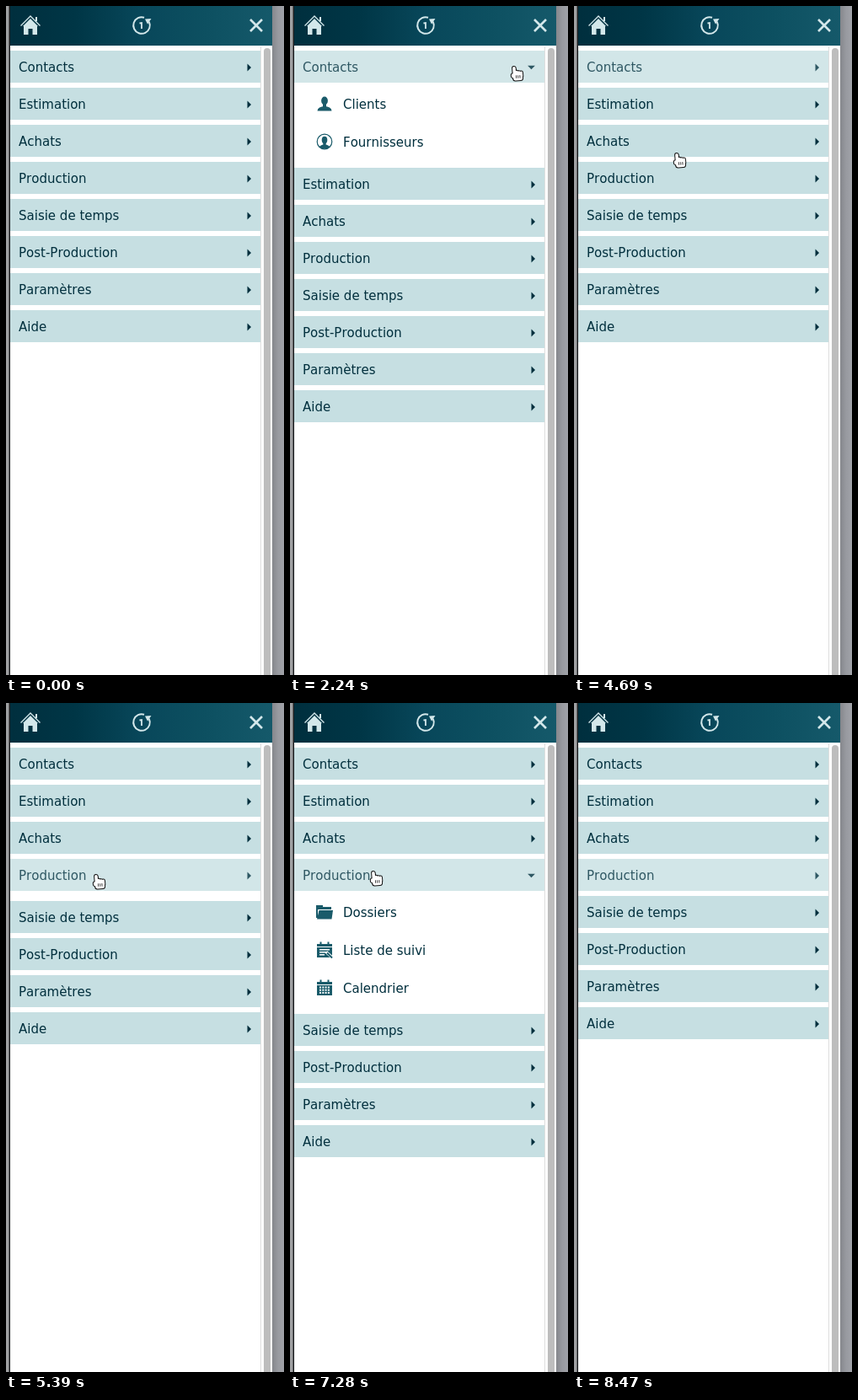
An HTML page with a canvas that plays this animation: 330x794 px, repeating every 8890 ms.

```html
<!DOCTYPE html>
<html lang="fr">
<head>
<meta charset="utf-8">
<title>Menu</title>
<style>
  html, body { margin: 0; width: 100%; height: 100%; overflow: hidden; background: #fff; }
  canvas { display: block; }
</style>
</head>
<body>
<canvas id="stage" width="330" height="794"></canvas>
<script>
const W = 330, H = 794, LOOP = 8890, STEP = 70;
const ctx = document.getElementById('stage').getContext('2d');
const DARK = '#002f3d', TEAL = '#1a5b6a', ROW = '#c6dfe2', LIGHT = '#d3e7ea';
const TOP = 53, ROW_H = 38, PITCH = 44, ITEM_H = 45;

const menu = ['Contacts', 'Estimation', 'Achats', 'Production', 'Saisie de temps',
  'Post-Production', 'Paramètres', 'Aide'].map(label => ({ label }));
Object.assign(menu[0], { open: 1960, close: 4410,
  items: [['Clients', bust], ['Fournisseurs', supplier]] });
Object.assign(menu[3], { open: 5390, close: 7630,
  items: [['Dossiers', folder], ['Liste de suivi', list], ['Calendrier', calendar]] });

// Pointer: where it enters, then each move to a new place
const entry = { x: 195, y: 702 };
const moves = [
  { from: 210, to: 1050, x: 266, y: 72 },
  { from: 2870, to: 3430, x: 43, y: 124 },
  { from: 3780, to: 4200, x: 178, y: 67 },
  { from: 4320, to: 4690, x: 122, y: 175 },
  { from: 4830, to: 5180, x: 107, y: 204 },
  { from: 6090, to: 6370, x: 141, y: 265 },
  { from: 6370, to: 6790, x: 35, y: 341 },
  { from: 7000, to: 7280, x: 99, y: 200 },
  { from: 7560, to: 8400, x: 160, y: 780 }
];

const mix = (a, b, k) => a + (b - a) * k;

// Smooth progress of t from start to end
function ease(t, start, end) {
  const v = Math.max(0, Math.min(1, (t - start) / (end - start)));
  return v * v * (3 - 2 * v);
}

function rect(x, y, w, h, color) {
  ctx.fillStyle = color;
  ctx.fillRect(x, y, w, h);
}

function trace(points) {
  ctx.beginPath();
  points.forEach(p => ctx.lineTo(...p));
}

function poly(points, color) {
  trace(points);
  ctx.fillStyle = color;
  ctx.fill();
}

function line(points, color, width) {
  trace(points);
  stroke(color, width);
}

function stroke(color, width) {
  ctx.strokeStyle = color;
  ctx.lineWidth = width;
  ctx.stroke();
}

function at(x, y, draw, turn = 0, scale = 1) {
  ctx.save();
  ctx.translate(x, y);
  ctx.rotate(turn);
  ctx.scale(scale, scale);
  draw();
  ctx.restore();
}

function text(label, x, y) {
  ctx.fillStyle = DARK;
  ctx.font = '15px "DejaVu Sans", Verdana, sans-serif';
  ctx.fontKerning = 'none';
  ctx.fillText(label, x, y);
}

// Submenu icons, centred on the current origin
function bust() {
  ctx.fillStyle = TEAL;
  ctx.beginPath();
  ctx.ellipse(0, -3.5, 3.9, 5, 0, 0, 7);
  ctx.fill();
  ctx.fillRect(-2, 0, 4, 4);
  ctx.beginPath();
  ctx.ellipse(0, 8.5, 8.5, 5.5, 0, Math.PI, 0);
  ctx.fill();
}

function supplier() {
  ctx.beginPath();
  ctx.arc(0, 0, 8.8, 0, 7);
  stroke(TEAL, 1.2);
  ctx.clip();
  at(0, 1, bust, 0, 0.85);
}

function folder() {
  rect(-10, -8, 8, 3, TEAL);
  rect(-10, -6, 18, 3, TEAL);
  rect(-10, -6, 2, 13, TEAL);
  poly([[-6.5, -2], [10, -2], [8.5, 8.5], [-9, 8.5]], TEAL);
}

function sheet() {
  rect(-9, -7, 18, 16, TEAL);
  for (const x of [-5.5, 3.5]) rect(x, -9.5, 2, 4, TEAL);
  rect(-9, -4, 18, 1, '#fff');
}

function list() {
  sheet();
  for (let i = 0; i < 3; i++) rect(-6, -1 + 3 * i, 12 - 3 * i, 1.5, '#fff');
  line([[2, 2.5], [9, 9]], '#fff', 3.5);
  line([[3, 3.5], [9, 9.5]], TEAL, 2);
}

function calendar() {
  sheet();
  for (let i = 0; i < 12; i++)
    rect(-6 + (i % 4) * 3.3, -1.5 + Math.floor(i / 4) * 3.2, 2, 2, '#fff');
}

function home() {
  line([[-11.5, 0.5], [0, -11], [11.5, 0.5]], LIGHT, 1.4);
  rect(6, -10, 2, 5, LIGHT);
  poly([[-9, 1], [0, -8], [9, 1]], LIGHT);
  for (const x of [-8, 2.5]) rect(x, 0, 5.5, 11, LIGHT);
  rect(-3, 0, 6, 4, LIGHT);
}

function clock() {
  ctx.beginPath();
  ctx.arc(0, 0, 9.8, -0.45, Math.PI * 1.6);
  stroke(LIGHT, 2);
  poly([[4, -7.5], [11.5, -8], [7, -1.5]], LIGHT);
  line([[-2.5, -2.5], [0, -3], [0, 4]], LIGHT, 1.8);
}

function cross() {
  for (const s of [-1, 1]) line([[-7, -7 * s], [7, 7 * s]], LIGHT, 2.6);
}

function shade(x, w, h, ...colors) {
  const g = ctx.createLinearGradient(x, 0, x + w, 0);
  colors.forEach((c, i) => g.addColorStop(i / (colors.length - 1), c));
  rect(x, 0, w, h, g);
}

function frame() {
  rect(0, 0, W, H, '#fff');
  rect(0, 0, 4, H, '#a0a1a3');
  rect(3.5, 0, 1.5, H, '#1c1e20');
  shade(316, 14, H, '#85878c', '#989aa0', '#a0a2a8');
  rect(302, 48, 1, H, '#dedede');
  ctx.fillStyle = '#bdbdbd';
  ctx.beginPath();
  ctx.roundRect(306, 50, 8, H, 4);
  ctx.fill();
  shade(5, 311, 47, '#002f3e', '#003646', '#08475a', '#0d5061', '#15596a');
  at(29, 23, home);
  at(161, 23, clock);
  at(297, 23, cross);
}

function gap({ items, open, close }, t) {
  if (!items || t < open) return 0;
  const full = ITEM_H * items.length + 5;
  return t < close
    ? mix(6, full, ease(t, open, open + 280))
    : mix(full, 0, ease(t, close, close + 210));
}

function caret() {
  poly([[-2.2, -4.4], [2.3, 0], [-2.2, 4.4]], DARK);
}

function row(label, y, expanded, hovered) {
  ctx.globalAlpha = hovered ? 0.78 : 1;
  rect(5, y, 297, ROW_H, ROW);
  text(label, 15, y + 25);
  at(expanded ? 286.5 : 288.7, y + 20, caret, expanded ? Math.PI / 2 : 0);
  ctx.globalAlpha = 1;
}

function children(items, top, height) {
  ctx.save();
  ctx.beginPath();
  ctx.rect(5, top, 297, height);
  ctx.clip();
  items.forEach(([label, icon], i) => {
    const y = top + 25 + ITEM_H * i;
    at(41, y, icon);
    text(label, 63, y + 6);
  });
  ctx.restore();
}

function panel(t) {
  const hovered = t < 1120 ? null : t < 4970 ? menu[0] : menu[3];
  let y = TOP;
  for (const group of menu) {
    const h = Math.round(gap(group, t));
    const expanded = t > group.open && t < group.close;
    row(group.label, y, expanded, group === hovered);
    if (expanded) children(group.items, y + ROW_H, h);
    y += PITCH + h;
  }
}

function arrow() {
  trace([[0, 0], [0, 14], [3.2, 11], [5.6, 16.6], [8, 15.6], [5.6, 10], [10, 10]]);
  ctx.closePath();
  stroke('#fff', 2);
  ctx.fillStyle = '#000';
  ctx.fill();
}

// One finger up, a thumb, and a palm with three knuckles
function hand() {
  ctx.beginPath();
  ctx.roundRect(-2, 0, 3.6, 11, 1.8);
  for (let i = 0; i < 3; i++) ctx.roundRect(1 + 2.6 * i, 5 + 0.6 * i, 3.2, 7, 1.6);
  ctx.roundRect(-4, 8, 4, 5, 2);
  ctx.roundRect(-2, 8, 11, 8.5, 2.5);
  stroke('#111', 2);
  ctx.fillStyle = '#fff';
  ctx.fill();
  for (let i = 0; i < 3; i++) rect(1.2 + 2.2 * i, 10.5, 0.8, 3.5, '#111');
}

function pointer(t) {
  if (t < moves[0].from || t > moves.at(-1).to) return;
  let { x, y } = entry;
  for (const m of moves) {
    const k = ease(t, m.from, m.to);
    x = mix(x, m.x, k);
    y = mix(y, m.y, k);
  }
  const pressed = t >= 1820 && y < 400;
  at(Math.round(x), Math.round(y), pressed ? hand : arrow, pressed ? -0.08 : 0);
}

function draw(now) {
  const t = Math.floor((now % LOOP) / STEP) * STEP;
  frame();
  panel(t);
  pointer(t);
}

const start = performance.now();
function tick() {
  draw(performance.now() - start);
  requestAnimationFrame(tick);
}
tick();
</script>
</body>
</html>
```
